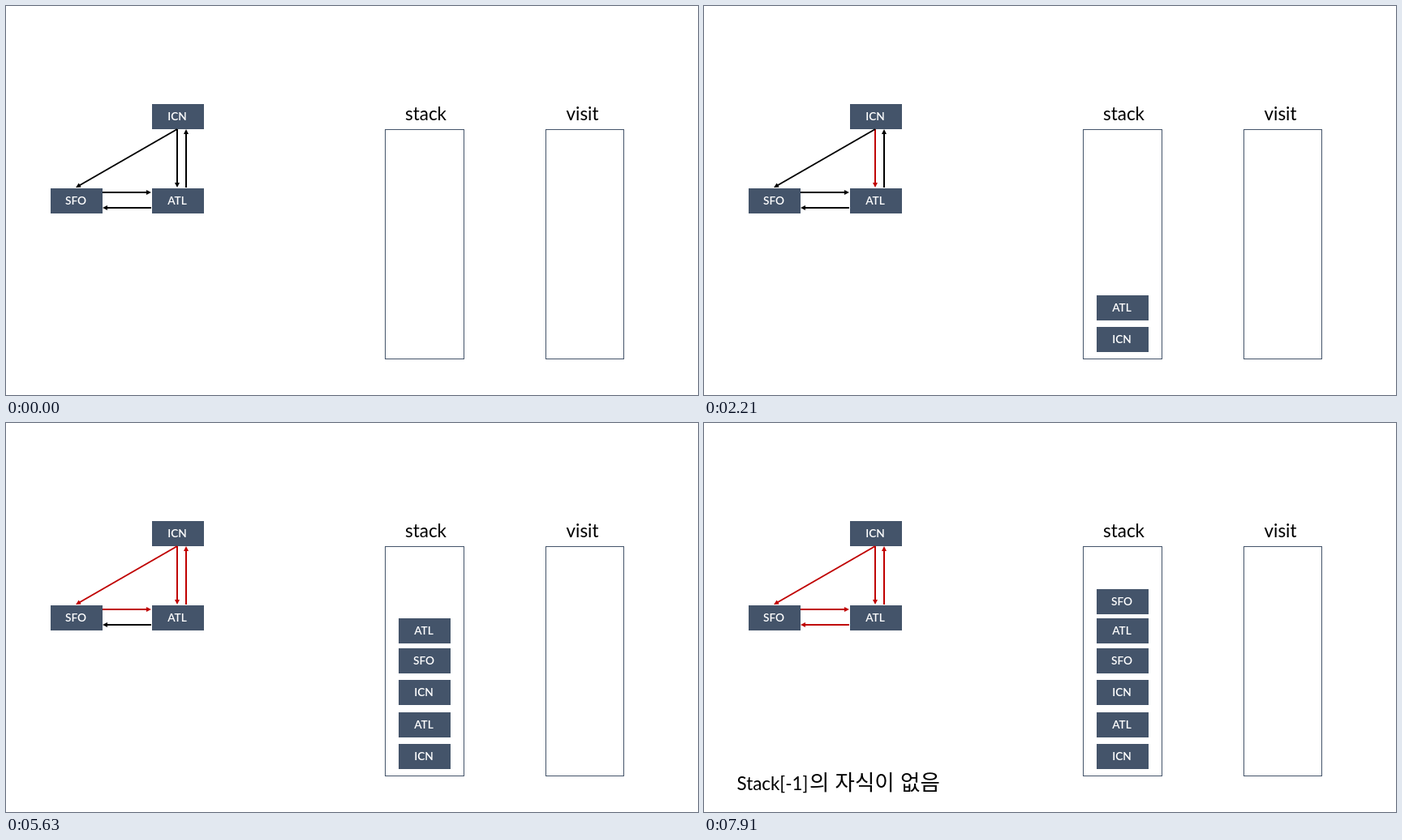
An HTML page for the animation above (8000 ms loop, 853 by 480 pixels).

```html
<!DOCTYPE html>
<html lang="ko">
<head>
<meta charset="utf-8">
<title>Stack walk</title>
<style>
  html, body { margin: 0; width: 100%; height: 100%; overflow: hidden; background: #fff; }
  svg { display: block; width: 100%; height: 100%; }
  text { font-family: Lato, sans-serif; font-size: 22.4px; }
  .mid { text-anchor: middle; }
  .code { font-size: 13.7px; font-weight: 600; fill: #fff; text-anchor: middle; }
  .ko { font-family: "Noto Sans CJK KR", "Noto Sans CJK", sans-serif; font-size: 26.5px; }
  .frame { fill: none; stroke: #44546a; stroke-width: 1; }
</style>
</head>
<body>
<svg id="stage" viewBox="0 0 853 480"></svg>
<script>
const LOOP = 8000, START = 1070, STEP = 1140;
const stage = document.getElementById('stage');

function add(tag, attrs, text, parent = stage) {
  const el = document.createElementNS('http://www.w3.org/2000/svg', tag);
  for (const key in attrs) el.setAttribute(key, attrs[key]);
  if (text) el.textContent = text;
  parent.appendChild(el);
  return el;
}

function label(x, y, cls, text, parent) {
  return add('text', { x, y, class: cls }, text, parent);
}

function node(x, y, name) {
  const g = add('g', {});
  add('rect', { x, y, width: 64, height: 31, fill: '#44546a' }, '', g);
  label(x + 31, y + 20.4, 'code', name, g);
  return g;
}

function arrow(x1, y1, x2, y2) {
  const len = Math.hypot(x2 - x1, y2 - y1);
  const angle = Math.atan2(y2 - y1, x2 - x1) * 180 / Math.PI;
  const g = add('g', { transform: `translate(${x1} ${y1}) rotate(${angle})` });
  add('path', { d: `M0 -1H${len - 5}V1H0Z` }, '', g);
  add('path', { d: `M${len} 0l-6 -3v6Z` }, '', g);
  return g;
}

function container(x, width, title, titleX) {
  add('rect', { x, y: 152.5, width, height: 283, class: 'frame' });
  label(titleX, 141, 'mid', title);
}

container(467.5, 97, 'stack', 517.5);
container(665.5, 96, 'visit', 710.5);

node(180, 121, 'ICN');
node(55, 225, 'SFO');
node(180, 225, 'ATL');

// Edges in the order they are walked
const edges = [
  arrow(211, 152, 211, 224),
  arrow(222, 224, 222, 152),
  arrow(211, 152, 86, 224),
  arrow(119, 230, 179, 230),
  arrow(179, 249, 119, 249)
];

const stackY = [396, 357, 317, 278, 241, 205];
const items = ['ICN', 'ATL', 'ICN', 'SFO', 'ATL', 'SFO']
  .map((name, i) => node(484, stackY[i], name));

const note = add('g', {});
label(40.5, 453, '', 'Stack[-1]', note);
label(130, 452.5, 'ko', '의', note);
label(161.5, 452.5, 'ko', '자식이', note);
label(242, 452.5, 'ko', '없음', note);

const show = (el, on) => el.setAttribute('visibility', on ? 'visible' : 'hidden');

function render(t) {
  const step = t < START ? 0 : 1 + Math.floor((t - START) / STEP);
  items.forEach((el, i) => show(el, step > i));
  edges.forEach((el, i) => el.setAttribute('fill', step > i + 1 ? '#c00000' : '#000'));
  show(note, step > items.length);
}

const origin = performance.now();
function tick() {
  render((performance.now() - origin) % LOOP);
  requestAnimationFrame(tick);
}
tick();
</script>
</body>
</html>
```
